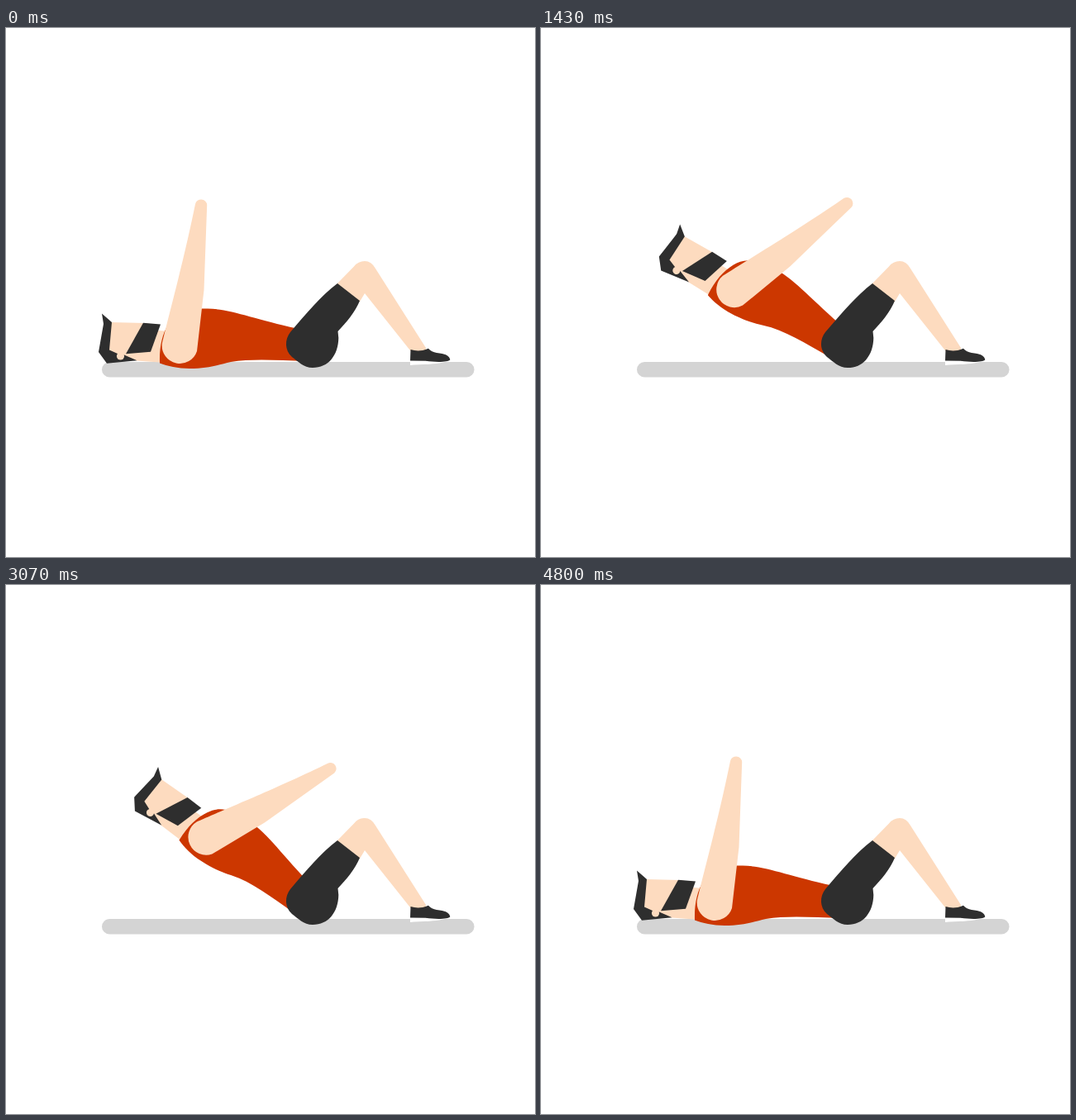
These frames come from a looping animation (640 by 640 pixels, 4.83 s). An HTML page:

```html
<!DOCTYPE html>
<html lang="en">
<head>
<meta charset="utf-8">
<title>Sit-up</title>
<style>
  html, body { margin: 0; width: 100%; height: 100%; overflow: hidden; background: #fff; }
  svg { display: block; width: 100%; height: 100%; }
  .skin { fill: #fddbbf; }
  .dark { fill: #2e2e2e; }
  .shirt { fill: #cc3700; }
</style>
</head>
<body>
<svg viewBox="0 0 640 640">
  <rect x="116" y="404" width="450.5" height="18.5" rx="9.25" fill="#d4d4d4"/>

  <g id="body">
    <path class="skin" d="M127 356 L168 357 L186 360 L183 366 L202 367 L202 405 L186 404.5 L158 402.5 L124 391 Z"/>
    <path class="dark" d="M116 345.5 L128 356 L125 389.5 L135 394 L143 395.5 L158.5 402.3 L122 405.7 L112 392 L118 358 Z"/>
    <circle class="skin" cx="138.5" cy="397" r="4.6"/>
    <path class="dark" d="M166 356.8 L187 358.4 L175 391.8 L145 394.2 Z"/>
    <path class="shirt" d="M186 405.5 C185.500 385 189 371 196 359 C203 347 214 339 244 339.500
      C272 340 300 352 352 363.500 L366 385 L362 403 C330 402 298 399.500 272 404
      C258 407 246 412 222 412 C208 412 195 409 186 405.500 Z"/>
  </g>

  <path class="skin" d="M400 310 L421 288.5 Q426 282 434 282 Q442 282 447 291 L508 387 V392 H490.5 L434 321 L428 331 L412 340 Z"/>
  <path fill="#fff" d="M489 401 V408 C505 407 526 407 537 402 Z"/>
  <path class="dark" d="M489.500 389 Q500 392.500 511 387.800 Q515 392 521 393 C531 394 536.500 396 537.300 401.500
    C535 404.500 519 404.500 508 402.800 L489 402.500 Z"/>
  <path class="dark" d="M401 309 L428 330 C422 344 412 356 401.500 367 L402.300 375 C402 396 390 411 371 411
    C360 411 353 403 346 398 C337 390 337 377 344 368 C361 348 382 323 401 309 Z"/>

  <path id="arm" class="skin" d="M229 213 A7.200 7.200 0 0 1 243.200 214 L239.500 317 L231 391
    A21.700 21.700 0 0 1 188.800 382 C192 368 202 329 208 305 C214 281 223 243 229 213 Z"/>
</svg>
<script>
  const LOOP = 4830, STEP = 40, HALF = 60;   // ms, ms, steps up
  const HIP = '359.2 396.2', SHOULDER = '210 387';
  const TORSO_TURN = 46.6, ARM_TURN = 26.7;  // degrees at the top
  const body = document.getElementById('body');
  const arm = document.getElementById('arm');

  const turn = (deg, pivot) => `rotate(${deg.toFixed(3)} ${pivot})`;

  function draw(ms) {
    const step = Math.floor((ms % LOOP + 10) / STEP);
    const lift = Math.max(0, 1 - Math.abs(step - HALF) / HALF);
    const lean = turn(lift * TORSO_TURN, HIP);
    body.setAttribute('transform', lean);
    arm.setAttribute('transform', lean + turn(lift * ARM_TURN, SHOULDER));
  }

  const start = performance.now();
  function tick() {
    draw(performance.now() - start);
    requestAnimationFrame(tick);
  }
  draw(0);
  requestAnimationFrame(tick);
</script>
</body>
</html>
```
